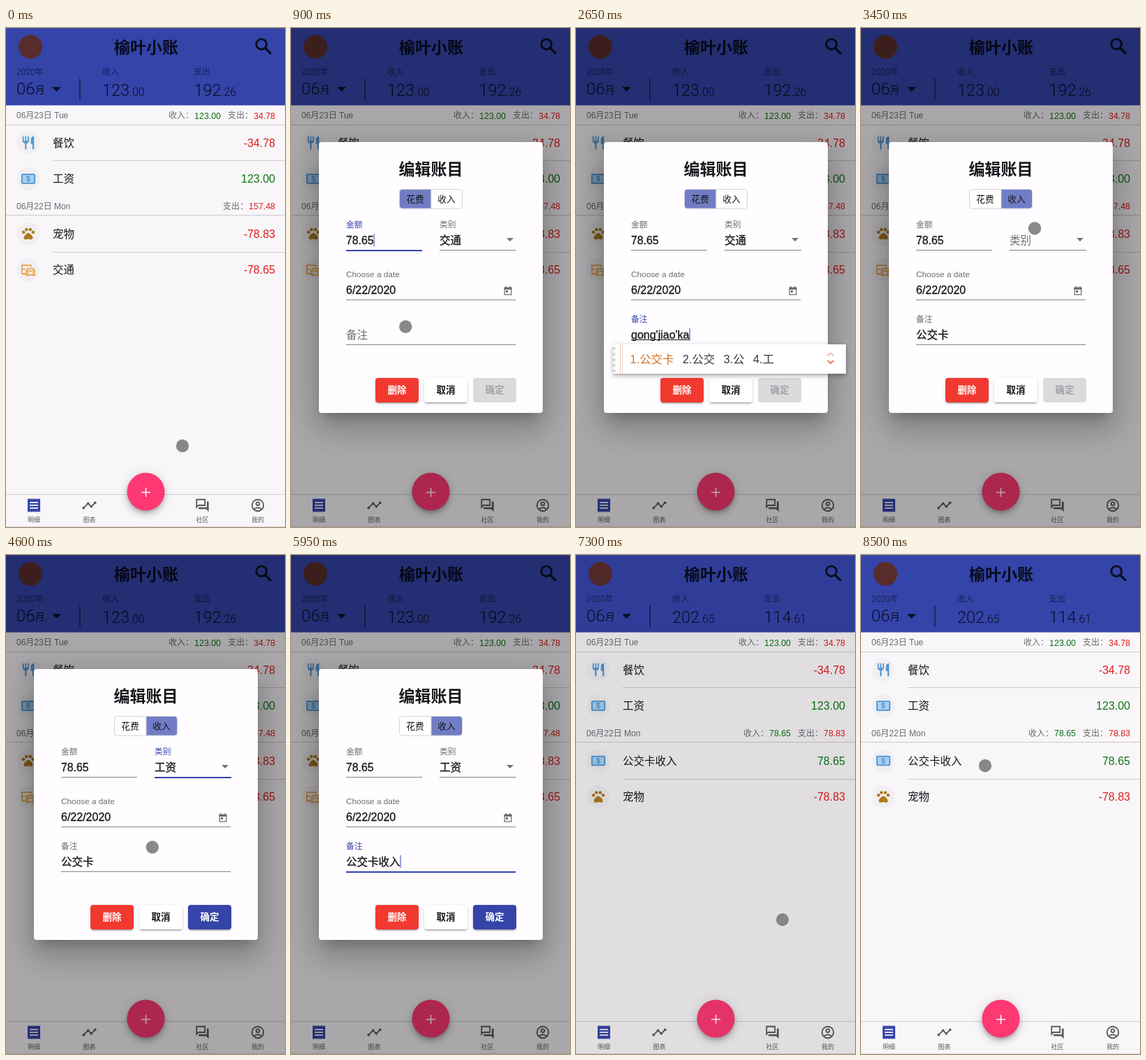
An HTML page with a canvas for the animation above (8.55 s loop, 400 by 713 pixels).

```html
<!DOCTYPE html>
<html lang="zh-CN">
<head>
<meta charset="utf-8">
<title>榆叶小账</title>
<style>
html, body { margin: 0; width: 100%; height: 100%; overflow: hidden; background: #f8f6f9; }
canvas { display: block; width: 100vw; height: 100vh; }
</style>
</head>
<body>
<canvas id="stage"></canvas>
<script>
const W = 400, H = 713, LOOP = 8550;
const FONT = '"Liberation Sans", "Noto Sans CJK SC", "Noto Sans CJK", sans-serif';
const THIN = 'Roboto, ' + FONT;
const BLUE = '#3444a9', INK = '#17161a', GREY = '#6d6b70', LINE = '#cccacd';
const GREEN = '#0d7516', RED = '#e11b1b', PAPER = '#f8f6f9';

const canvas = document.getElementById('stage');
const c = canvas.getContext('2d');

function resize() {
  const r = window.devicePixelRatio || 1;
  canvas.width = Math.round(innerWidth * r);
  canvas.height = Math.round(innerHeight * r);
}
addEventListener('resize', resize);
resize();

// ---------- helpers ----------
const clamp = v => Math.max(0, Math.min(1, v));
const mix = (a, b, k) => a + (b - a) * k;
const smooth = u => u * u * (3 - 2 * u);
const span = (t, start, len) => clamp((t - start) / len);
const within = (t, a, b) => t >= a && t < b;

function bezier(x1, y1, x2, y2) {
  const at = (a, b, s) => 3 * (1 - s) * (1 - s) * s * a + 3 * (1 - s) * s * s * b + s * s * s;
  return x => {
    let lo = 0, hi = 1;
    for (let i = 0; i < 20; i++) {
      const m = (lo + hi) / 2;
      if (at(x1, x2, m) < x) lo = m; else hi = m;
    }
    return at(y1, y2, lo);
  };
}
const swift = bezier(.25, .8, .25, 1);
const decel = bezier(0, 0, .2, 1);

// y is the visual middle of the text
function text(s, x, y, size, color = INK, align = 'left', weight = 400, font = FONT) {
  c.font = `${weight} ${size}px ${font}`;
  c.textAlign = align;
  c.fillStyle = color;
  c.fillText(s, x, y + size * .365);
  return c.measureText(s).width;
}

// Field values are a touch heavier than regular
function value(s, x, y, size) {
  const w = text(s, x, y, size);
  c.strokeStyle = INK;
  c.lineWidth = .3;
  c.strokeText(s, x, y + size * .365);
  return w;
}

function box(x, y, w, h, r, fill) {
  c.beginPath();
  c.roundRect(x, y, w, h, r);
  if (fill) { c.fillStyle = fill; c.fill(); }
}

function rect(x, y, w, h, fill) {
  c.fillStyle = fill;
  c.fillRect(x, y, w, h);
}

function disc(x, y, r, fill) {
  c.beginPath();
  c.arc(x, y, r, 0, 7);
  c.fillStyle = fill;
  c.fill();
}

function ring(x, y, r) {
  c.beginPath();
  c.arc(x, y, r, 0, 7);
  c.stroke();
}

function poly(...p) {
  c.beginPath();
  for (let i = 0; i < p.length; i += 2) c.lineTo(p[i], p[i + 1]);
}

// Material shadows: offset, blur and spread of three layers
const elevation = {
  low: [[3, 1, -2], [2, 2, 0], [1, 5, 0]],
  menu: [[2, 4, -1], [4, 5, 0], [1, 10, 0]],
  fab: [[3, 5, -1], [6, 10, 0], [1, 18, 0]],
  high: [[11, 15, -7], [24, 38, 3], [9, 46, 8]]
};

function raised(level, x, y, w, h, r, fill) {
  const k = c.getTransform().a, away = 2000;
  c.save();
  elevation[level].forEach(([dy, blur, grow], i) => {
    c.shadowColor = `rgba(0,0,0,${[.2, .14, .12][i]})`;
    c.shadowBlur = blur * k;
    c.shadowOffsetX = away * k;
    c.shadowOffsetY = dy * k;
    box(x - grow - away, y - grow, w + 2 * grow, h + 2 * grow, Math.max(0, r + grow), '#000');
  });
  c.restore();
  box(x, y, w, h, r, fill);
}

// Draws an icon on a 24-unit grid centred on x, y
function icon(draw, x, y, size, color) {
  c.save();
  c.translate(x, y);
  c.scale(size / 24, size / 24);
  c.translate(-12, -12);
  c.fillStyle = c.strokeStyle = color;
  c.lineWidth = 2;
  draw(color);
  c.restore();
}

function arrow(x, y, w, color) {
  poly(x - w / 2, y - w / 4, x + w / 2, y - w / 4, x, y + w / 4);
  c.fillStyle = color;
  c.fill();
}

// ---------- icons ----------
const icons = {
  food() {
    c.fill(new Path2D('M11 9H9V2H7v7H5V2H3v7c0 2.1 1.7 3.8 3.8 4V22h2.4v-9C11.3 12.8 13 11.1 13 9V2h-2zM16 6v8h2.5v8H21V2c-2.8 0-5 2.2-5 4z'));
  },
  money(color) {
    box(2, 5, 20, 14, 1, '#a9d0f2');
    c.strokeStyle = color;
    c.stroke();
    text('$', 12, 12, 11.5, color, 'center', 700);
  },
  paw(color) {
    [[4.5, 9.5], [9, 5.5], [15, 5.5], [19.5, 9.5]].forEach(p => disc(...p, 2.5, color));
    c.fill(new Path2D('M12 10.5c2.2 0 3.5 2.5 5.5 4.2 2.3 2 2 6-1 6.3-1.5.2-3-.7-4.5-.7s-3 .9-4.5.7c-3-.3-3.3-4.3-1-6.3 2-1.7 3.3-4.2 5.5-4.2z'));
  },
  car(color) {
    c.lineWidth = 1.6;
    poly(9, 18, 2, 18, 2, 5, 16, 5, 16, 8);
    c.stroke();
    poly(2, 11, 8, 11);
    c.stroke();
    poly(9, 20, 9, 14, 11, 10, 20, 10, 22, 14, 22, 20);
    c.closePath();
    c.stroke();
    poly(9, 14, 22, 14);
    c.stroke();
    for (const x of [12, 19]) disc(x, 17, 1.2, color);
    for (const x of [4, 9.5, 19.5]) rect(x, x > 4 ? 20 : 18, 2, 2, color);
  },
  search() {
    c.lineWidth = 2.1;
    ring(9.5, 9.5, 5.5);
    c.lineWidth = 2.5;
    poly(13.6, 13.6, 19.8, 19.8);
    c.stroke();
  },
  receipt() {
    c.beginPath();
    for (let i = 0; i <= 12; i++) c.lineTo(3 + i * 1.5, i % 2 ? 3.5 : 2);
    for (let i = 12; i >= 0; i--) c.lineTo(3 + i * 1.5, i % 2 ? 20.5 : 22);
    c.fill();
    for (const y of [7, 11, 15]) rect(6, y, 12, 2, '#dcdcee');
  },
  chart(color) {
    const p = [3, 16, 10, 9, 15, 14, 21, 8];
    poly(...p);
    c.stroke();
    for (let i = 0; i < 8; i += 2) disc(p[i], p[i + 1], 2, color);
  },
  chat() {
    poly(3, 15, 3, 3, 16, 3, 16, 12, 5.6, 12);
    c.closePath();
    c.stroke();
    c.fill(new Path2D('M21 6h-2v9H6v2c0 .6.4 1 1 1h11l4 4V7c0-.6-.4-1-1-1z'));
  },
  person() {
    ring(12, 12, 9);
    ring(12, 9.5, 2.6);
    c.beginPath();
    c.moveTo(6, 18);
    c.quadraticCurveTo(12, 13, 18, 18);
    c.stroke();
  },
  calendar(color) {
    c.strokeRect(4, 5, 16, 16);
    rect(3, 4, 18, 5, color);
    rect(6, 1, 2, 4, color);
    rect(16, 1, 2, 4, color);
    rect(7, 11, 5, 5, color);
  }
};

// ---------- main page ----------
const kinds = { food: '#5598d3', money: '#4d93d2', paw: '#ad7a1c', car: '#e59b35' };
const NIGHT = '#0b0e22';

function total(x, y, whole, cents) {
  const w = text(whole, x, y, 23.5, NIGHT, 'left', 300, THIN);
  text(cents, x + w, y + 2.8, 16, NIGHT, 'left', 300, THIN);
}

function topBar(after) {
  rect(0, 0, W, 110.5, BLUE);
  rect(0, 0, W, 1, '#4a569f');
  disc(35, 27, 17, '#582c2b');
  text('榆叶小账', 201, 27.5, 23, '#080b1c', 'center', 700);
  icon(icons.search, 369.5, 26.5, 32, '#0a0d1e');
  const label = '#1a2252';
  text('2020年', 15, 63, 12, label);
  text('收入', 138, 63, 12, label);
  text('支出', 269, 63, 12, label);
  const w = text('06', 15, 86, 24, NIGHT, 'left', 300, THIN);
  text('月', 15 + w, 88, 14, NIGHT);
  arrow(72.5, 87.5, 13, NIGHT);
  rect(105.3, 72, 1.3, 31, '#141a3c');
  total(138, 88.5, after ? '202' : '123', after ? '.65' : '.00');
  total(269.5, 88.5, after ? '114' : '192', after ? '.61' : '.26');
}

function day(y, name, income, cost) {
  text(name, 15, y, 12, GREY);
  let x = 386;
  const part = (label, amount, color) => {
    x -= text(amount, x, y, 12.4, color, 'right') + 37;
    text(label, x, y, 12, GREY);
    x -= 10;
  };
  part('支出：', cost, RED);
  if (income) part('收入：', income, GREEN);
  rect(0, Math.floor(y + 13), W, 1, LINE);
}

function row(y, kind, name, amount) {
  disc(32, y, 16.5, '#f1eff2');
  icon(icons[kind], 32, y, 22, kinds[kind]);
  text(name, 67, y, 15.5);
  text(amount, 386, y, 16, amount[0] === '-' ? RED : GREEN, 'right');
}

function list(after) {
  day(125, '06月23日 Tue', '123.00', '34.78');
  row(164, 'food', '餐饮', '-34.78');
  rect(67, 189, 333, 1, LINE);
  row(215.5, 'money', '工资', '123.00');
  if (after) {
    day(254.5, '06月22日 Mon', '78.65', '78.83');
    row(294, 'money', '公交卡收入', '78.65');
    row(345.5, 'paw', '宠物', '-78.83');
  } else {
    day(254.5, '06月22日 Mon', '', '157.48');
    row(294, 'paw', '宠物', '-78.83');
    row(345.5, 'car', '交通', '-78.65');
  }
  rect(67, 320, 333, 1, LINE);
}

function navBar() {
  rect(0, 666, W, 1, '#cfcdd0');
  rect(0, 712, W, 1, '#dddbde');
  [['receipt', 40, '明细'], ['chart', 119.5, '图表'], ['chat', 281.5, '社区'], ['person', 361, '我的']]
    .forEach(([name, x, label], i) => {
      icon(icons[name], x, 682, i ? 22 : 24, i ? '#5c5a5e' : BLUE);
      text(label, x, 703, 9, '#5c5a5e', 'center');
    });
  raised('fab', 173.5, 635.5, 54, 54, 27, '#fd3873');
  rect(194, 662.8, 13, 1.5, '#fff');
  rect(199.8, 657, 1.5, 13, '#fff');
}

// ---------- dialog ----------
const OPEN = 500, CLOSE = 7205, TO_INCOME = 3150, MENU = 3620, PICK = 4200;

// Each step: time, committed text, composition, candidates
const typing = [
  [1450, '', 'g', '个 给 过 刚 高'],
  [1570, '', 'go', '狗 够 购 沟 勾'],
  [1690, '', 'gon', '共 工 公 功 供'],
  [1810, '', 'gong', '共 工 公 功 供'],
  [1940, '', "gong'j", '工具 攻击 公交 公斤 kg'],
  [2090, '', "gong'ji", '攻击 公鸡 公积 供给 工'],
  [2180, '', "gong'jia", '公家 攻 公 工 共'],
  [2280, '', "gong'jiao", '公交 共 公 工 攻'],
  [2420, '', "gong'jiao'k", '公交卡 公交 公 工'],
  [2520, '', "gong'jiao'ka", '公交卡 公交 公 工'],
  [2680, '公交卡', '', ''],
  [5050, '公交卡', 's', '是 说 时 上'],
  [5150, '公交卡', 'sh', '是 说 时 上'],
  [5260, '公交卡', 'sho', '手 收 受 首'],
  [5360, '公交卡', 'shou', '手 收 受 首'],
  [5480, '公交卡', "shou'r", '收入 手 收 受'],
  [5580, '公交卡', "shou'ru", '收入 手 收 受'],
  [5740, '公交卡收入', '', '']
];

function focusAt(t) {
  if (within(t, 620, 1030)) return ['amount', 620];
  if (within(t, 1030, TO_INCOME)) return ['memo', 1030];
  if (within(t, 3600, 4780)) return ['kind', 3600];
  if (t >= 4780) return ['memo', 4780];
  return ['', 0];
}

function caret(x, y, t, since) {
  if ((t - since) % 1000 < 550) rect(x, y - 9, 1, 18, BLUE);
}

// lift: 0 = label rests in the field, 1 = label floats above it
function field(x, y, w, label, focused, lift = 1) {
  text(label, x, mix(y, y - 22.5, lift), mix(15.5, 11.8, lift), focused && lift ? BLUE : GREY);
  rect(x, Math.floor(y + 14), w, focused ? 2 : 1, focused ? BLUE : '#858388');
}

function button(x, label, fill, color, level = 'low') {
  if (level) raised(level, x, 500, 62, 35, 4, fill);
  else box(x, 500, 62, 35, 4, fill);
  text(label, x + 31, 517.5, 13.5, color, 'center', 700);
}

function toggle(income) {
  box(155.5, 230.5, 90, 27.5, 4, '#fff');
  c.save();
  c.clip();
  rect(income ? 201 : 155, 230, 45.5, 29, '#707dc5');
  c.restore();
  c.lineWidth = 1;
  c.strokeStyle = '#d3d1d6';
  c.stroke();
  rect(200.5, 231, 1, 27, '#d3d1d6');
  text('花费', 178, 244.5, 12.7, INK, 'center');
  text('收入', 223, 244.5, 12.7, INK, 'center');
}

function candidates(x, words) {
  raised('menu', x, 452, 387 - x, 42, 0, '#fff');
  for (let i = 0; i < 5; i++) rect(x, 456 + i * 8, 3.5, 4, '#d8d6d9');
  rect(x + 10, 452, 1, 42, '#f0c8b4');
  rect(x + 13, 452, 1, 42, '#f4dccf');
  let tx = x + 24.5;
  words.forEach((word, i) => {
    tx += text(`${i + 1}.${word}`, tx, 473, 16.4, i ? '#39373b' : '#d8701c', 'left', i ? 400 : 500) + 12.3;
  });
  c.lineWidth = 1.5;
  c.strokeStyle = '#f0a78c';
  poly(360.5, 468.5, 365, 464.5, 369.5, 468.5);
  c.stroke();
  c.strokeStyle = '#e2552d';
  poly(360.5, 475, 365, 479, 369.5, 475);
  c.stroke();
}

function memo(t, focus, since) {
  const step = typing.filter(s => s[0] <= t).pop() || [0, '', '', ''];
  const [, done, comp, words] = step;
  const active = focus === 'memo';
  field(79, 438.5, 243, '备注', active, swift(span(t, 1030, 400)));
  const x = 79 + value(done, 79, 438, 15.5);
  const w = comp ? value(comp, x, 438, 16) : 0;
  if (comp) rect(x, 445, w, 1, INK);
  if (active) caret(x + w, 438, t, Math.max(since, step[0]));
  return comp ? () => candidates(x - 26, words.split(' ')) : null;
}

function menu(t, pointerY) {
  const k = decel(span(t, MENU, 120)), out = 1 - span(t, PICK, 100);
  if (!k || !out) return;
  c.save();
  c.globalAlpha *= k * out;
  c.translate(0, 279);
  c.scale(1, mix(.8, 1, k));
  raised('menu', 197, 0, 142, 192, 4, '#fff');
  ['工资', '兼职', '理财', '其他'].forEach((name, i) => {
    const hover = Math.floor((pointerY - 279) / 48) === i;
    if (hover) rect(197, i * 48, 142, 48, '#f3f2f4');
    text(name, 213, i * 48 + 24, 15.5);
  });
  c.restore();
}

function dialog(t, pointerY) {
  const k = decel(span(t, OPEN, 150)), out = 1 - span(t, CLOSE, 75);
  if (!k || !out) return;
  const [focus, since] = focusAt(t);
  const income = t >= TO_INCOME, picked = t >= PICK;
  const valid = within(t, 2680, TO_INCOME) || picked;

  c.save();
  c.globalAlpha = k * out;
  c.translate(200.5, 356.5);
  c.scale(mix(.7, 1, k), mix(.7, 1, k));
  c.translate(-200.5, -356.5);
  raised('high', 40, 163, 321, 387, 4, '#fffdff');
  text('编辑账目', 200.5, 201.7, 23, INK, 'center', 700);
  toggle(income);

  field(79, 303.5, 109, '金额', focus === 'amount');
  const w = value('78.65', 79, 303.5, 15.8);
  if (focus === 'amount') caret(79 + w, 303, t, since);

  const empty = income && !picked;
  field(213, 303.5, 110, '类别', focus === 'kind', empty ? swift(span(t, 3600, 300)) : 1);
  if (!empty) value(income ? '工资' : '交通', 213, 303, 15.5);
  arrow(314, 302.5, 10, '#757378');

  field(79, 374.5, 243, 'Choose a date', false);
  value('6/22/2020', 79, 374.5, 16);
  icon(icons.calendar, 311, 375.5, 14.5, '#69676b');

  const ime = memo(t, focus, since);
  button(121, '删除', '#f2392f', '#fff');
  button(191, '取消', '#fff', INK);
  if (valid) button(261, '确定', BLUE, '#fff');
  else button(261, '确定', '#dcdadd', '#a5a3a7', '');
  menu(t, pointerY);
  if (ime) ime();
  c.restore();
}

// ---------- pointer ----------
const route = [
  [0, 253, 597], [420, 166, 346], [650, 166, 346], [975, 164, 439],
  [2750, 164, 439], [3090, 224, 244], [3250, 224, 244], [3560, 259, 303],
  [3750, 259, 303], [4050, 236, 304], [4300, 236, 304], [4700, 205, 438],
  [6150, 205, 438], [6850, 296, 521], [7300, 296, 521], [8080, 178, 301], [LOOP, 178, 301]
];

function pointerAt(t) {
  const i = route.findIndex(p => p[0] > t);
  const a = route[i - 1], b = route[i];
  const k = smooth((t - a[0]) / (b[0] - a[0]));
  return [mix(a[1], b[1], k), mix(a[2], b[2], k)];
}

function pointer(t, x, y) {
  if (within(t, 1450, 2750) || within(t, 5050, 6150)) return;
  disc(x, y, 10.3, 'rgba(255,255,255,.55)');
  disc(x, y, 9.2, 'rgba(92,91,94,.72)');
}

// ---------- loop ----------
function render(t) {
  c.setTransform(canvas.width / W, 0, 0, canvas.height / H, 0, 0);
  const after = t >= CLOSE;
  const [x, y] = pointerAt(t);
  rect(0, 0, W, H, PAPER);
  topBar(after);
  list(after);
  navBar();
  const shade = swift(span(t, OPEN, 400)) - swift(span(t, CLOSE, 400));
  if (shade > 0) rect(0, 0, W, H, `rgba(0,0,0,${.32 * shade})`);
  dialog(t, y);
  pointer(t, x, y);
}

const began = performance.now();
function tick() {
  render(Math.max(0, performance.now() - began) % LOOP);
  requestAnimationFrame(tick);
}
tick();
</script>
</body>
</html>
```
